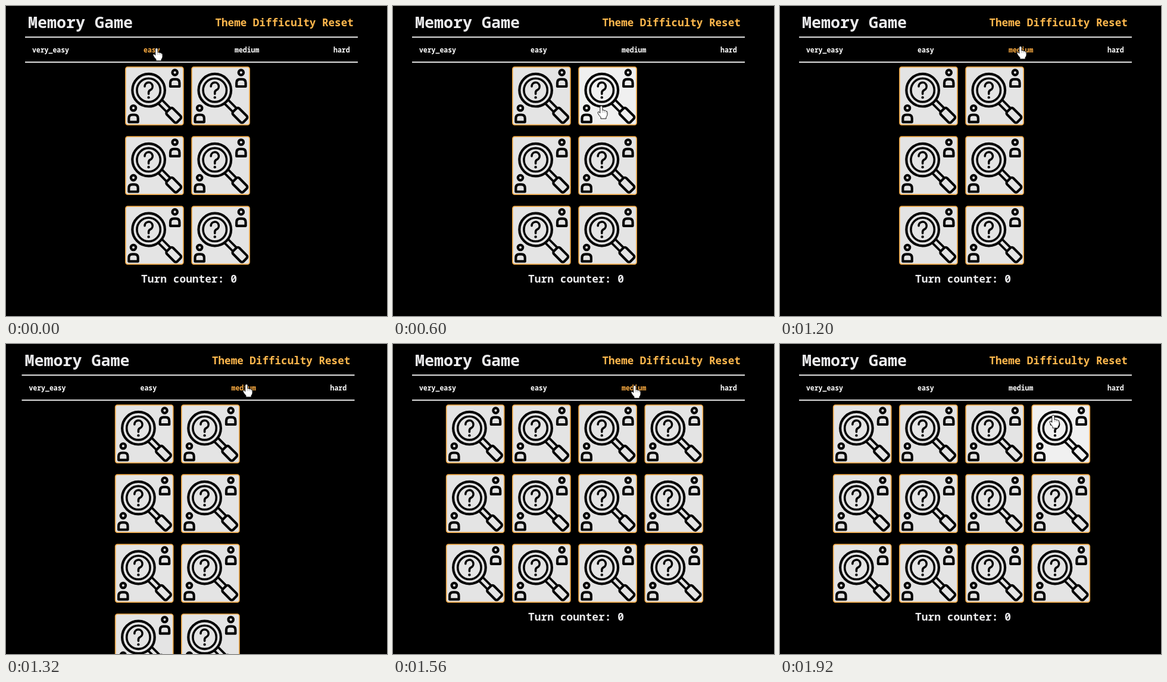
Write an HTML page that moves like this. It is 640 by 520 pixels and loops after 2.04 s.

```html
<!DOCTYPE html>
<html lang="en">
<head>
<meta charset="utf-8">
<title>Memory Game</title>
<style>
  html, body { margin: 0; width: 100%; height: 100%; overflow: hidden; background: #000; }
  svg { display: block; width: 100%; height: 100%; }
  text { font-family: "Noto Sans Mono", "DejaVu Sans Mono", monospace; font-weight: 700; fill: #ececee; }
  .title { font-size: 26.7px; }
  .nav { font-size: 17.6px; fill: #ffb84d; }
  .menu text { font-size: 11.5px; fill: #fff; }
  .menu text.hot { fill: #ffae42; }
  .counter { font-size: 17.9px; }
  .rule { fill: #f4f4f4; }
  .card { fill: #e4e4e4; }
  .card.hot { fill: #f0f0f0; }
  .frame { stroke: #f0ab4c; stroke-width: 1.7; }
  .ink { fill: none; stroke: #050505; stroke-width: 4.2; stroke-linejoin: round; }
  .cursor { fill: #fff; stroke: #111; stroke-width: 1; stroke-linejoin: round; }
</style>
</head>
<body>
<svg viewBox="0 0 640 520">
  <defs>
    <g id="person">
      <circle cx="83.7" cy="10.2" r="4.2"/>
      <path d="M76 33.6V27.5q0-6 6-6h3.400q6 0 6 6v6.100z"/>
    </g>
    <g id="card">
      <rect class="frame" x=".9" y=".9" width="97" height="97" rx="3.500"/>
      <g class="ink">
        <use href="#person"/>
        <use href="#person" x="-69.7" y="59.6"/>
        <g transform="translate(39.6 39.8) rotate(45)">
          <circle r="27.3"/>
          <circle r="19.700" stroke-width="3.600"/>
          <path d="M28-4.300H47M28 4.300H47" stroke-width="3.800"/>
          <rect x="47.300" y="-7.300" width="24.500" height="14.600" rx="3.500"/>
        </g>
        <path d="M33 33.600a6.600 6.600 0 1 1 9.500 5.800q-2.900 1.500-2.900 4.200v2.400" stroke-width="3.600" stroke-linecap="round"/>
        <circle cx="39.600" cy="52" r="2.200" fill="#050505" stroke="none"/>
      </g>
    </g>
  </defs>

  <rect width="640" height="520"/>
  <g id="header">
    <text class="title" x="37" y="37">Memory Game</text>
    <text class="nav" x="351.500" y="34">Theme Difficulty Reset</text>
    <rect class="rule" x="32" y="51.300" width="559" height="1.900"/>
    <g class="menu">
      <text x="43.900" y="77.500">very_easy</text>
      <text id="easy" x="231" y="77.500">easy</text>
      <text id="medium" x="384" y="77.500">medium</text>
      <text x="550" y="77.500">hard</text>
    </g>
    <rect class="rule" x="32" y="93.300" width="559" height="1.900"/>
  </g>
  <g id="board"></g>
  <text id="counter" class="counter" x="307.500" text-anchor="middle">Turn counter: 0</text>
  <g id="cursor" class="cursor">
    <path id="arrow" d="M0 0V16.500L3.800 13 6.500 18.600 9.200 17.300 6.600 11.900H11.800Z"/>
    <g id="hand">
      <path d="M-2.200 1.500Q-2.200-.5 0-.5T2 1.500V7Q4 5.800 5 7.500 7 6.500 7.800 8.400 10 8 10 10.500V14.500Q9.500 17 8 18.500V21H-1V18.500Q-4 15.500-5.500 12.500-6.800 9.800-5 9.500-3.800 9.200-2.200 11.500Z"/>
      <path d="M2 7V11M5 7.500V11M7.800 8.400V11.500" fill="none" stroke="#777" stroke-width=".6"/>
    </g>
  </g>
</svg>
<script>
  const LOOP = 2040, STEP = 120, PITCH_X = 111.2, PITCH_Y = 116.9;
  const $ = id => document.getElementById(id);

  // Pointer tip at each step.
  const path = [
    [253, 71], [263, 92], [287, 150], [308, 188], [322, 199], [350, 168],
    [378, 113], [392, 57], [396, 61], [402, 67], [404, 68], [404, 68],
    [404, 68], [406, 70], [409, 73], [434, 98], [459, 120]
  ];

  function layoutAt(step) {
    if (step < 11) return { x: 200, cols: 2, count: 6, shift: 0 };
    if (step === 11) return { x: 182.8, cols: 2, count: 12, shift: -5.5 };
    if (step === 12) return { x: 114.3, cols: 3, count: 12, shift: 0 };
    return { x: 88.8, cols: 4, count: 12, shift: 0 };
  }

  function hotCardAt(step) {
    if (step >= 1 && step <= 3) return 0;
    if (step >= 5 && step <= 7) return 1;
    return step === 16 ? 3 : -1;
  }

  function draw(step) {
    const { x, cols, count, shift } = layoutAt(step);
    const hotCard = hotCardAt(step);
    const onEasy = step === 0;
    const onMedium = step >= 9 && step <= 14;
    const [px, py] = path[step];
    const pointing = onEasy || onMedium || step === 2 || step === 5 || step === 6 || step === 16;

    $("header").setAttribute("transform", `translate(${shift} 0)`);
    $("easy").classList.toggle("hot", onEasy);
    $("medium").classList.toggle("hot", onMedium);
    $("board").innerHTML = Array.from({ length: count }, (_, i) => {
      const left = x + (i % cols) * PITCH_X;
      const top = 101.4 + Math.floor(i / cols) * PITCH_Y;
      return `<use href="#card" class="card${i === hotCard ? " hot" : ""}" x="${left}" y="${top}"/>`;
    }).join("");
    $("counter").setAttribute("y", 113.3 + count / cols * PITCH_Y);
    $("cursor").setAttribute("transform", `translate(${px} ${py})`);
    $("arrow").style.display = pointing ? "none" : "";
    $("hand").style.display = pointing ? "" : "none";
  }

  let shown = -1;
  const start = performance.now();
  function tick() {
    const step = Math.floor((performance.now() - start) % LOOP / STEP);
    if (step !== shown) draw(shown = step);
    requestAnimationFrame(tick);
  }
  tick();
</script>
</body>
</html>
```
